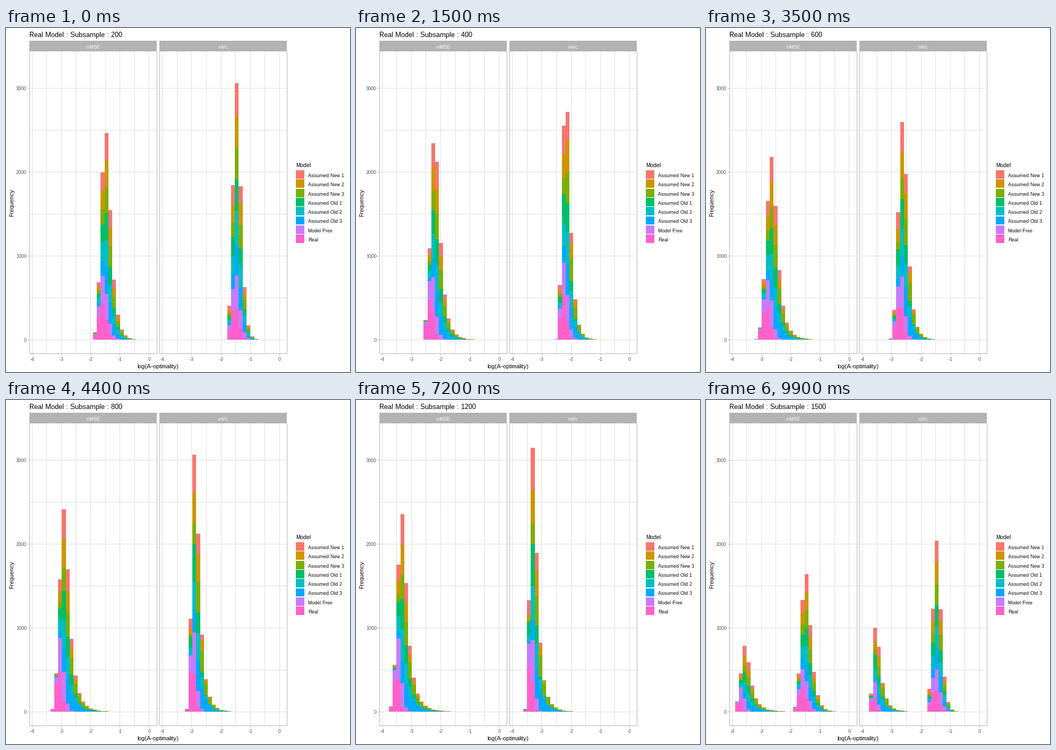
These frames come from a looping animation (648 px wide and 648 px high, 10 s). A matplotlib script:

```python
import math

import numpy as np
import matplotlib.pyplot as plt
from matplotlib.animation import FuncAnimation
from matplotlib.patches import Rectangle

plt.rcParams.update({"font.family": "Liberation Sans",
                     "text.hinting": "native", "text.hinting_factor": 1})

SIZE = 648
GREY, GRID, TICK = "#B3B3B3", "#DEDEDE", "#4D4D4D"
MODELS = {
    "Assumed New 1": "#F8766D", "Assumed New 2": "#CD9600",
    "Assumed New 3": "#7CAE00", "Assumed Old 1": "#00BE67",
    "Assumed Old 2": "#00BFC4", "Assumed Old 3": "#00A9FF",
    "Model Free": "#C77CFF", "Real": "#FF61CC",
}
BINS, SAMPLES, BASE = 30, 8000, 587
SIZES = range(200, 1501, 100)

# spread: centre, left scale, right scale and tail weight, at the smallest
# and the largest size; each runs straight in log(size) between them.
# odds: slope and crossing point of a model's log-odds against "Assumed 2",
# each as a + b * log(size / 200).
PANELS = [
    {"name": "mMSE", "dx": 0.0,
     "spread": ([18.15, 0.56, 1.0, 0.015], [2.64, 0.59, 0.88, 0.2]),
     "odds": {"3": (0.15, 0.17, 0.0, 0.0),
              "Free": (-0.43, -0.48, -0.25, -0.28),
              "Real": (-1.0, -0.9, -0.45, -0.45)}},
    {"name": "mVc", "dx": 245.65,
     "spread": ([18.36, 0.5, 0.78, -0.01], [2.67, 0.31, 0.84, 0.14]),
     "odds": {"1": (-0.15, -0.25, -0.3, 0.0),
              "3": (0.13, 0.3, 0.1, 0.0),
              "Free": (-0.2, -0.5, -0.15, -0.18),
              "Real": (-0.55, -0.9, -0.2, -0.3)}},
]


def totals(spread, growth):
    """Bar totals from a skewed quantile function."""
    first, last = map(np.array, spread)
    t = growth / math.log(SIZES[-1] / SIZES[0])
    centre, left, right, tail = first + t * (last - first)
    p = np.linspace(0, 1 - 1e-4, 8001)
    r = -np.log(1 - p)
    q = centre + left * np.log(p + 0.01) + right * r + tail * r**2
    return SAMPLES * np.diff(np.interp(np.arange(BINS + 1), q, p))


def counts(panel, n):
    """Counts by model and bin, in legend order."""
    growth = math.log(n / SIZES[0])
    total = totals(panel["spread"], growth)
    k = np.arange(BINS)
    u = k - (k * total).sum() / total.sum()
    scores = []
    for name in MODELS:
        s0, s1, c0, c1 = panel["odds"].get(name.split()[-1], (0, 0, 0, 0))
        x = np.clip(u, -3, 3) if name.startswith("Assumed") else u
        scores.append((s0 + s1 * growth) * (x - c0 - c1 * growth))
    weight = np.exp(scores)
    return total * weight / weight.sum(axis=0)


STATES = np.array([[counts(panel, n) for panel in PANELS] for n in SIZES])

fig = plt.figure(figsize=(SIZE / 72, SIZE / 72), dpi=72, facecolor="white")
ax = fig.add_axes([0, 0, 1, 1])
ax.axis("off")


def box(x, y, w, h, color, z=1):
    ax.add_patch(Rectangle((math.floor(x), math.floor(y)), w, h, fc=color,
                           lw=0, antialiased=False, zorder=z))


def label(x, y, text, size, color="black", ha="left", va="baseline", **kw):
    return ax.text(x, y, text, fontsize=size, color=color, ha=ha, va=va,
                   zorder=5, **kw)


def x_pos(v):
    return 49.15 + 55.15 * (v + 4)


def y_pos(count):
    return BASE + 0.3 - 0.158 * count


def draw_panel(name, dx):
    left = math.floor(44 + dx)
    for v in np.arange(-4, 0.1, 0.5):
        box(x_pos(v) + dx, 43, 1, 570, GRID)
    for v in range(0, 3001, 500):
        box(left, y_pos(v), 240, 1, GRID)
    for v in range(-4, 1):
        box(x_pos(v) + dx, 614, 1, 2, GREY)
        label(x_pos(v) + dx, 627, str(v), 9, TICK, "center")
    box(left, 24, 240, 20, GREY)
    box(left, 613, 241, 1, GREY, 4)
    for x in (left, left + 240):
        box(x, 44, 1, 569, GREY, 4)
    label(left + 120, 39, name, 9, "white", "center")


def draw_bars(dx):
    edges = np.floor(55 + dx + 7.28 * np.arange(BINS + 1))
    flat = np.full(BINS, float(BASE))
    return [ax.stairs(flat, edges, baseline=flat, fill=True, color=c, lw=0,
                      antialiased=False, zorder=3) for c in MODELS.values()]


def draw_legend():
    label(546, 262, "Model", 11)
    for i, (name, c) in enumerate(MODELS.items()):
        y = 268.15 + 17.28 * i
        top, bottom = round(y), round(y + 15.9)
        box(546, top, 16, bottom - top, c)
        label(569, round(y + 12.8), name, 9)


for panel in PANELS:
    draw_panel(panel["name"], panel["dx"])
bars = [draw_bars(panel["dx"]) for panel in PANELS]
for v in range(0, 3001, 1000):
    box(41, y_pos(v), 3, 1, GREY)
    label(39, round(y_pos(v) + 3.7), str(v), 9, TICK, "right")
label(286.5, 641, "log(A-optimality)", 11, ha="center")
label(11.5, 329, "Frequency", 11, ha="center", va="center", rotation=90)
draw_legend()
title = label(44, 17, "", 13)
ax.set_xlim(0, SIZE)
ax.set_ylim(SIZE, 0)


def progress(frame):
    """States passed so far, with the fraction of the running change."""
    done, start = 0.0, 4
    for i in range(len(SIZES)):
        steps = 4 if i < 3 else 3
        done += min(max((frame - start + 1) / steps, 0), 1)
        start += steps + 4
    return done


def update(frame):
    done = progress(frame)
    i = int(done + 1e-6)
    t = max(done - i, 0)
    mix = (1 - t) * STATES[i] + t * STATES[(i + 1) % len(STATES)]
    title.set_text(f"Real Model : Subsample : {SIZES[i]}")
    for patches, rows in zip(bars, mix):
        tops = np.round(y_pos(np.cumsum(rows[::-1], axis=0)[::-1]))
        bases = np.vstack([tops[1:], np.full(BINS, float(BASE))])
        for patch, top, base in zip(patches, tops, bases):
            patch.set_data(values=top, baseline=base)
    return [title] + sum(bars, [])


anim = FuncAnimation(fig, update, frames=100, interval=100, repeat=True,
                     repeat_delay=0, blit=False)
plt.show()
```
